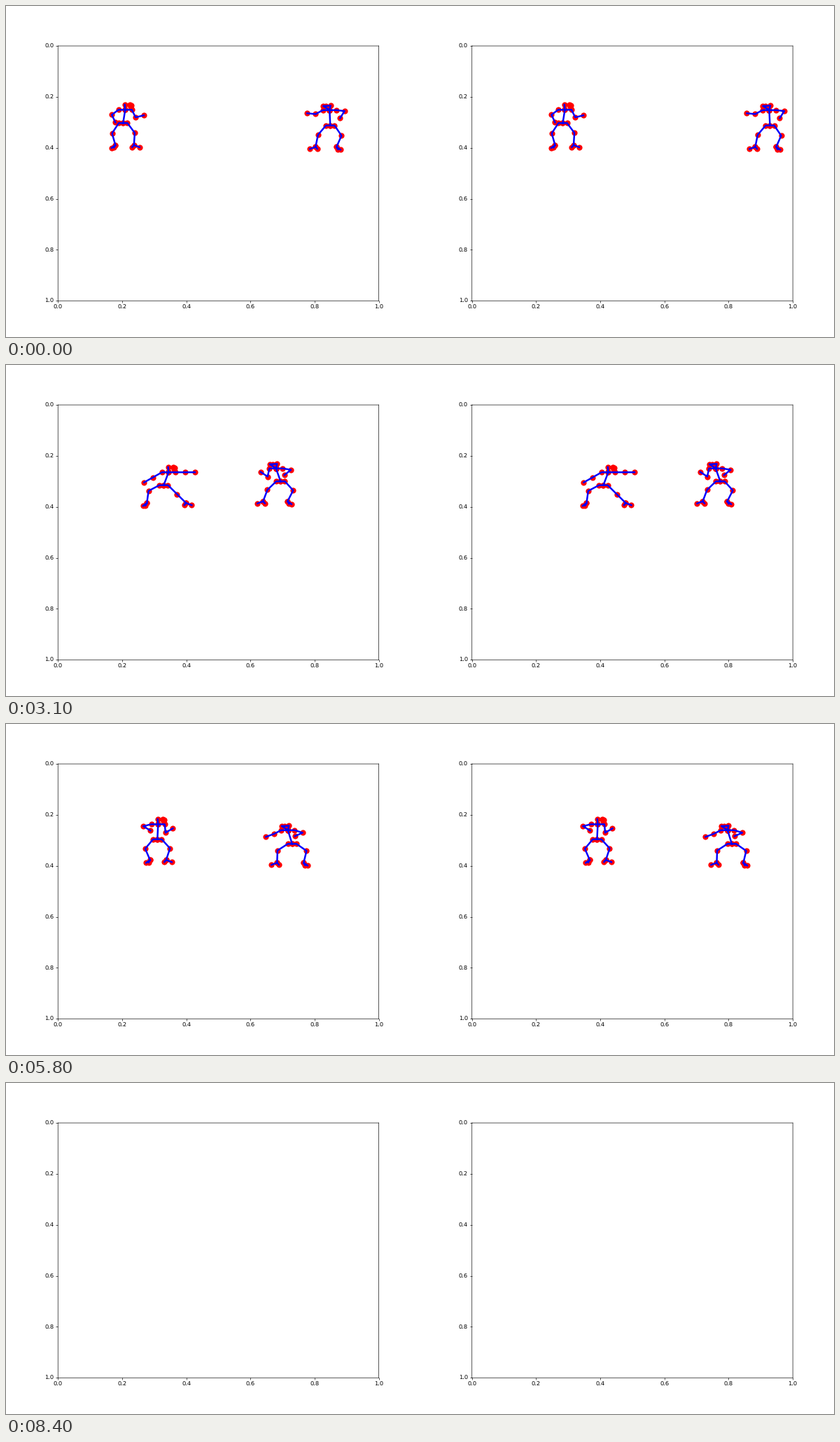
Recreate the animation shown at these times as a matplotlib script. Size 1183 px wide and 473 px high, loop 8500 ms.

```python
import numpy as np
import matplotlib.pyplot as plt
from matplotlib.animation import FuncAnimation

plt.rcParams["text.hinting"] = "none"

DPI = 59.15
W, H = 1183, 473
FRAMES, STEP = 85, 100
SHIFT = 0.08  # the right view sees everyone a little further right
ORIGIN = np.array([0.0625 * W, 0.12 * H])
SIZE = np.array([0.3875 * W, 0.77 * H])

ARM, LEG = 12, 17.5           # length of each half of a limb
SHOULDER, HIP = 9.5, 6.2      # half widths
KEY_TIMES = [0, 900, 1700, 3100, 4100, 5800, 6600, 8300]


def limb(start, end, length, side):
    """Two equal bones from start to end, bent towards the given side."""
    v = end - start
    d = np.hypot(*v)
    bend = np.sqrt(max(length**2 - d**2 / 4, 0))
    middle = (start + end) / 2 + side * bend * np.array([-v[1], v[0]]) / d
    return [start, middle, end]


class Fighter:
    """A stick figure posed by its neck, hands and feet.

    Each pose holds: pelvis y, ankle y, neck x y (from the pelvis),
    rear hand x y, front hand x y (from the neck),
    rear foot x, front foot x (from the pelvis); x grows forwards.
    """

    def __init__(self, facing, head, face, path, poses, lift):
        self.facing = facing
        self.head, self.face = np.array(head), np.array(face)
        self.path = np.array(path).T
        poses = np.array(poses, float)
        last = poses[0].copy()
        last[:2] += lift
        self.keys = np.vstack([poses[:1], poses, last]).T

    def at(self, t):
        """Strokes and loose face dots in stage pixels."""
        (hip_y, ground, nx, ny, rx, ry, fx, fy, rear, front) = [
            np.interp(t, KEY_TIMES, k) for k in self.keys]
        pelvis = np.array([0, hip_y])
        neck = pelvis + [nx, ny]
        shoulder, hip = np.array([SHOULDER, 0]), np.array([HIP, 0])
        foot_r, foot_f = np.array([rear, ground]), np.array([front, ground])

        arm_r = limb(neck - shoulder, neck + [rx, ry], ARM, 1)
        arm_f = limb(neck + shoulder, neck + [fx, fy], ARM, 1)
        leg_r = limb(pelvis - hip, foot_r, LEG, 1)
        leg_f = limb(pelvis + hip, foot_f, LEG, -1)
        strokes = [
            neck + self.head,
            arm_r[::-1] + [neck] + arm_f,
            [neck, pelvis],
            leg_r[::-1] + [pelvis] + leg_f,
            [foot_r + [-2, 3.5], foot_r, foot_r + [-5.5, 4]],
            [foot_f + [-2.5, 2.8], foot_f, foot_f + [8, 3]],
        ]
        place = [np.interp(t, *self.path), 0]
        flip = [self.facing, 1]
        return ([np.array(s) * flip + place for s in strokes],
                (neck + self.face) * flip + place)


fighters = [
    Fighter(1, [(0, 0), (-0.7, -7.3)], [(7, -7), (8.3, -6), (7.5, -4.7)],
            [(0, 167), (900, 163.5), (1700, 228), (3100, 225), (3600, 220),
             (4100, 114), (4500, 117), (5400, 178), (5800, 216), (6500, 261),
             (7200, 262), (8300, 178.5)],
            [(167, 198.5, 3, -19, -14, 18, 26.5, 8, -11, 15.5),
             (171, 196.5, 0, -18, -16, 10, 21.5, 8, -21, 28.5),
             (171.5, 197, 7, -18.5, -35, 14.5, 37.5, 0, -24, 32),
             (170.5, 197.5, 0, -20.5, -38, 4.5, 26, 6.5, 24.5, 7),
             (164.5, 194, 1, -21.5, -11, 9, 21, 6, -10.5, 12.5),
             (169.5, 193, -0.5, -21, -11, 9.5, 18, 9.5, -12, 33)],
            lift=-8),
    Fighter(-1, [(0, 0), (-1.5, -6.5), (5, -6), (9, -6), (0, 0)], [(0, 0)],
            [(0, 463), (900, 460), (1700, 391), (2300, 468), (2700, 412),
             (3100, 392), (3600, 348), (4100, 252.5), (4500, 264),
             (5800, 408.5), (7100, 420), (8300, 458.5)],
            [(170.5, 201, 1, -22, -15, 11.5, 32, 4.5, -9, 21),
             (171, 198.5, 6, -19, -17.5, 12, 34, 5, -23, 27.5),
             (166, 194.5, 6.5, -18.5, -12, 9.5, 22, 5, -10, 25),
             (187, 201, 12.5, -16, -31.5, 10, 35, 3.5, -49.5, 14.5),
             (171, 198, 6, -19.5, -10, 8.5, 31.5, 9.5, -16.5, 21.5),
             (174.5, 198.5, 9, -17.5, -23, 8.5, 38.5, 8, -28, 25.5)],
            lift=4),
]

fig, axes = plt.subplots(1, 2, figsize=(W / DPI, (H + 0.001) / DPI), dpi=DPI)
fig.subplots_adjust(left=0.06275, right=0.95025, bottom=0.1094, top=0.8794,
                    wspace=0.1125 / 0.3875)

views = []
for ax, shift in zip(axes, (0, SHIFT)):
    ax.set_xlim(0, 1)
    ax.set_ylim(1, 0)
    for spine in ax.spines.values():
        spine.set_snap(False)
    dots, = ax.plot([], [], "o", color="red", ms=10, mew=0, zorder=2)
    bones, = ax.plot([], [], color="blue", lw=3, zorder=3)
    views.append((shift, dots, bones))


def update(i):
    joints, lines = [np.empty((0, 2))], [np.empty((0, 2))]
    if i < FRAMES - 1:  # the stage is empty at the very end
        for fighter in fighters:
            strokes, face = fighter.at(i * STEP)
            joints += strokes + [face]
            for s in strokes:
                lines += [s, [[np.nan, np.nan]]]
    joints = (np.vstack(joints) - ORIGIN) / SIZE
    lines = (np.vstack(lines) - ORIGIN) / SIZE
    artists = []
    for shift, dots, bones in views:
        dots.set_data(joints[:, 0] + shift, joints[:, 1])
        bones.set_data(lines[:, 0] + shift, lines[:, 1])
        artists += [dots, bones]
    return artists


anim = FuncAnimation(fig, update, frames=FRAMES, interval=STEP,
                     repeat=True, repeat_delay=0, blit=False)
plt.show()
```
